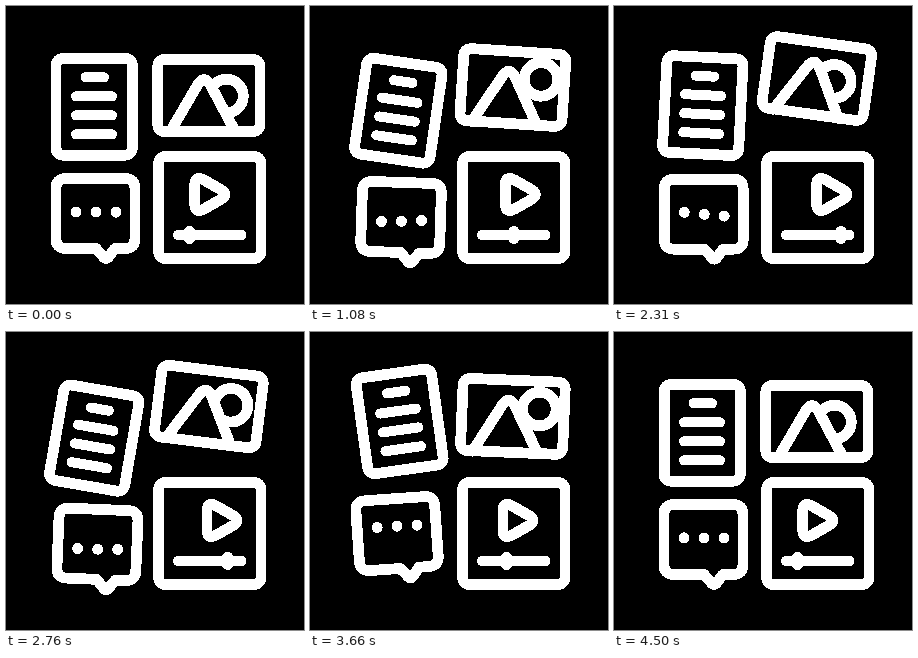
Animation, 298 px wide and 298 px high, one loop 4.53 s. Source, as an HTML page:

```html
<!DOCTYPE html>
<html lang="en">
<head>
<meta charset="utf-8">
<title>Content icons</title>
<style>
  html, body {
    margin: 0;
    width: 100%;
    height: 100%;
    overflow: hidden;
    background: #000;
  }

  svg {
    display: block;
    width: 100%;
    height: 100%;
    fill: none;
    stroke: #fff;
    stroke-width: 10.8;
    stroke-linecap: round;
    stroke-linejoin: round;
    shape-rendering: crispEdges;
  }

  .move {
    animation: 4530ms cubic-bezier(.37, 0, .63, 1) infinite;
  }

  .doc     { animation-name: doc;     transform-origin: 88.2px 100.8px; }
  .bubble  { animation-name: bubble;  transform-origin: 90px 207px; }
  .picture { animation-name: picture; transform-origin: 202.9px 89.5px; }
  .sun     { animation-name: sun; }
  .play    { animation-name: play; }
  .knob    { animation-name: knob; }
  .dot     { animation-name: dot; fill: #fff; stroke: none; }
  .dot.late { animation-delay: -4440ms; }
  .dot.lead { animation-delay: -90ms; }
  .mountain { fill: #000; }

  /* Swings: five 900 ms legs, then a short hold */
  @keyframes doc {
    0%, 99.34%, 100% { translate: 0 0; rotate: 0deg; }
    19.87%, 59.6%    { translate: 0 5.5px; rotate: 10deg; }
    39.74%, 79.47%   { translate: 1.5px -11.5px; rotate: -8deg; }
  }
  @keyframes bubble {
    0%, 99.34%, 100% { translate: 0 0; rotate: 0deg; }
    19.87%, 59.6%    { translate: 2px 5px; rotate: 2.5deg; }
    39.74%, 79.47%   { translate: -2.5px -6px; rotate: -4deg; }
  }
  @keyframes dot {
    0%, 99.34%, 100% { translate: 0 0; }
    19.87%, 59.6%    { translate: 0 6.5px; }
    39.74%, 79.47%   { translate: 0 -6px; }
  }

  /* There and back once per loop */
  @keyframes picture {
    0%, 99.34%, 100% { translate: 0 0; rotate: 0deg; }
    49.67%           { translate: 0 -17px; rotate: 8deg; }
  }
  @keyframes play {
    0%, 99.34%, 100% { translate: 0 0; }
    49.67%           { translate: 14px 0; }
  }
  @keyframes knob {
    0%, 99.34%, 100% { translate: 0 0; }
    49.67%           { translate: 43.5px 0; }
  }

  /* There and back twice per loop */
  @keyframes sun {
    0%, 49.67%, 99.34%, 100% { translate: 0 0; }
    24.83%, 74.5%            { translate: 10px -10.5px; }
  }
</style>
</head>
<body>
<svg viewBox="0 0 298 298">
  <g class="move doc">
    <rect x="50.1" y="52.4" width="76.2" height="96.8" rx="7"/>
    <path stroke-width="10" d="M79.5 71.3H98M70 90.3H106M70 109.3H106M70 128.3H106"/>
  </g>

  <g class="move picture">
    <circle class="move sun" cx="220.5" cy="90" r="16.8"/>
    <path class="mountain" d="M164 126L191 80Q198 67 205 80L229.5 126"/>
    <rect x="151.8" y="53.4" width="102.2" height="72.2" rx="7"/>
  </g>

  <g class="move bubble">
    <path d="M60 172.5H119Q129 172.5 129 182.5V232.5Q129 242.5 119 242.5H109
      L104 249Q100 256 96 249L90 242.5H60Q50 242.5 50 232.5V182.5Q50 172.5 60 172.5Z"/>
    <circle class="move dot late" cx="70" cy="206" r="5.5"/>
    <circle class="move dot" cx="90" cy="206" r="5.5"/>
    <circle class="move dot lead" cx="110" cy="206" r="5.5"/>
  </g>

  <rect x="152.7" y="150.4" width="102.2" height="102.2" rx="7"/>
  <path class="move play" d="M188.7 179.5Q188.7 169 198 174L215.5 184
    Q222 188.5 215.5 193L198 203Q188.7 208 188.7 197.5Z"/>
  <path stroke-width="10" d="M172 229H235.5"/>
  <path class="move knob" stroke-width="11.5" d="M183.5 225.8V232.2"/>
</svg>
</body>
</html>
```
